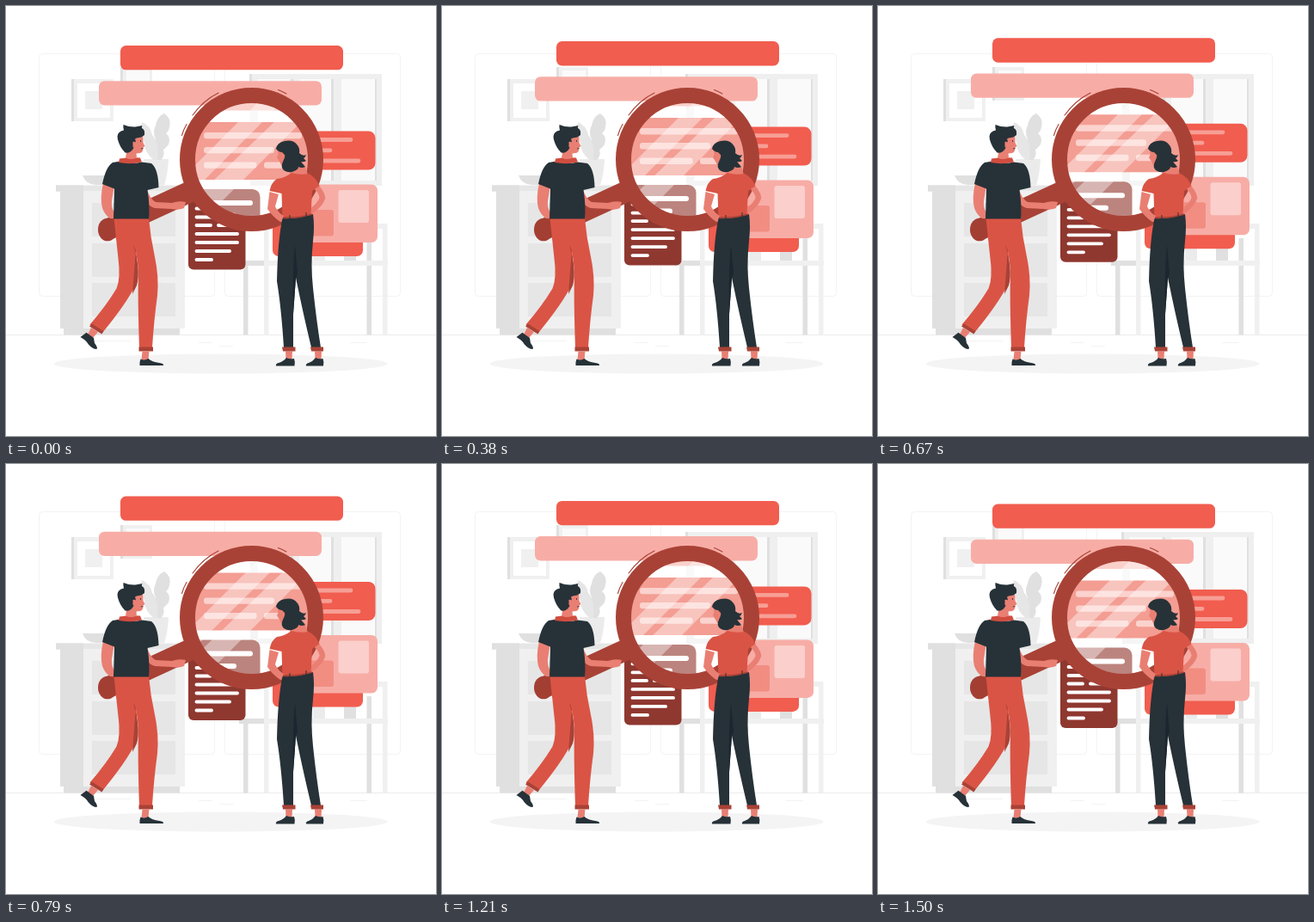
An HTML page for the animation above (1.54 s loop, 500x500 px).

```html
<!DOCTYPE html>
<html lang="en">
<head>
<meta charset="utf-8">
<title>Search illustration</title>
<style>
html, body { margin: 0; width: 100%; height: 100%; overflow: hidden; background: #fff; }
svg { display: block; width: 100vw; height: 100vh; }
.red { fill: #f15d4f; } .pink { fill: #f7ada6; } .rim { fill: #a94236; }
.dark { fill: #263238; } .skin { fill: #e97f73; } .cloth { fill: #da5445; }
.g1 { fill: #e0e0e0; } .g2 { fill: #e6e6e6; } .g3 { fill: #f0f0f0; } .g4 { fill: #fafafa; }
.line { fill: none; stroke: #a94236; stroke-width: 1.1; stroke-linecap: round; }
</style>
</head>
<body>
<svg viewBox="0 0 500 500">
<defs><clipPath id="glass"><circle cx="285.5" cy="178.5" r="66"/></clipPath></defs>

<!-- room -->
<g fill="none" stroke="#f3f3f3">
  <rect x="38.5" y="55.5" width="204" height="282" rx="4"/>
  <rect x="254.5" y="55.5" width="204" height="282" rx="4"/>
  <path d="M0 382.5H500" stroke="#ececec"/>
  <path d="M224 391.5h16M248 395.5h16M400 391.5h20M105 389.5h40"/>
</g>
<path class="g3" d="M76 85h49v49H76z"/>
<path class="g1" d="M76 85h3v49h-3z"/>
<path fill="#fff" d="M83 90h38v40H83z"/>
<path class="g3" d="M92 99h20v21H92z"/>
<path class="g3" d="M133 71h37v39h-37z"/>
<path class="g1" d="M133 71h3v39h-3z"/>
<path fill="#fafafa" d="M140 75h27v31h-27z"/>
<path fill="#efefef" d="M283 79h154v130H283z"/>
<path class="g4" d="M292 85h38v118h-38zM341 85h37v118h-37zM390 85h39v118h-39z"/>
<path class="g1" d="M283 79h3v130h-3zM331 85h3v118h-3zM378 85h3v118h-3zM429 85h2v118h-2z"/>

<path class="g1" d="M89 197h34v11h-18q-12 0-16-11z"/>
<path fill="#ebebeb" d="M160 178h29q-1 19-5 30h-18q-5-13-6-30z"/>
<path class="g1" d="M173 179q-4-14 1-24-4-8 0-16 2-11 10-14 9 6 6 16-1 5-4 7 6 5 3 13-4 5-6 6 2 8-3 12z"/>
<path fill="#e6e6e6" d="M172 179q-11-8-11-20-6-9-3-24 10 4 12 15 8 8 6 29z"/>
<path class="g2" d="M58 208.500h150v7H58z"/>
<path class="g1" d="M58 208.500h32v7H58zM63 215.500h27V375H63zM67 375h135v7.500H67z"/>
<path class="g3" d="M90 215.500h118V375H90z"/>
<path class="g2" d="M100 229h97v39h-97zM100 276h97v39h-97zM100 322h97v39h-97z"/>

<path class="g3" d="M300 253h143.500v129.500H438V259H305.500v123.500H300z"/>
<path class="g1" d="M276 300h5.500v82.500H276zM419.500 270h5.500v112.500h-5.500z"/>
<path class="g1" d="M393 280h14v17h-14z"/>
<path fill="#ebebeb" d="M357 280h14v17h-14z"/>
<path class="g3" d="M271 296h173v6H271z"/>
<path class="g1" d="M271 296h29v6h-29z"/>
<ellipse cx="249.500" cy="416" rx="194" ry="11.500" fill="#f4f4f4"/>

<!-- floating cards -->
<g class="float">
  <rect class="red" x="133" y="46" width="259" height="28.300" rx="6.500"/>
  <rect class="pink" x="108" y="87.200" width="259" height="28.300" rx="6.500"/>
  <rect class="red" x="320" y="145.500" width="109.500" height="45" rx="8"/>
  <path d="M346 155.500h55M346 167.800h31M346 180h64" stroke="#f79e95" stroke-width="4.800" stroke-linecap="round"/>
  <rect class="red" x="310" y="235" width="105" height="56" rx="7"/>
  <rect class="pink" x="335" y="207.500" width="97" height="67.500" rx="7"/>
  <rect x="386.500" y="214" width="35.500" height="38" rx="3" fill="#fbcfcb"/>
  <rect x="345" y="237" width="36" height="30.500" rx="3" fill="#f28d82"/>
  <rect x="212" y="218" width="66.500" height="88.500" rx="6" fill="#8f3830"/>
  <path d="M221.500 235.500h30M221.500 245.500h30M221.500 255h16.500M247 255h22M221.500 265h47.500M221.500 275h47.500M221.500 285h38.500M221.500 295h17.500" stroke="#fff" stroke-width="3.900" stroke-linecap="round"/>
</g>

<!-- lens -->
<g clip-path="url(#glass)">
  <path fill="#fff" d="M215 108h141v141H215z"/>
  <path fill="#f5f5f5" d="M284 113h9v96h-9zM331 113h8v96h-8zM284 203h60v6h-60z"/>
  <g class="float">
    <path fill="#fad0cb" d="M210 80h150v41.500H210z"/>
    <rect x="205" y="135" width="160" height="67" rx="8" fill="#f39d93"/>
    <g fill="#fbd2cd">
      <rect x="230" y="147" width="114" height="7.300" rx="3"/>
      <rect x="230" y="164" width="82" height="7.300" rx="3"/>
      <rect x="230" y="181.500" width="61.500" height="7.300" rx="3"/>
      <rect x="300" y="181.500" width="40" height="7.300" rx="3"/>
    </g>
    <rect x="200" y="213" width="95.500" height="80" rx="9" fill="#bc847e"/>
    <path d="M205 229h79M205 243.500h60" stroke="#fff" stroke-width="6" stroke-linecap="round"/>
  </g>
  <path fill="#fff" fill-opacity=".4" d="M297 108h28L205 228v-28zM370 108 235 243h-20V228L340 108z"/>
</g>
<path d="M120.500 259 216 215" stroke="#a94236" stroke-width="25" stroke-linecap="round"/>
<ellipse cx="118" cy="260" rx="11" ry="13.300" fill="#a33e33"/>
<circle cx="285.500" cy="178.500" r="74.500" fill="none" stroke="#a94236" stroke-width="18"/>
<path class="line" d="M204.500 150.500q2-7 5.500-13M217 127q12-17 30-26M316.500 97.500q5 2 9.500 4.500"/>

<!-- man -->
<path class="skin" d="M113 206q-4 17-1 29 3 8 9 12l6 0v-6q-5-5-4-14l3-19z"/>
<path class="cloth" d="M125.500 246.500h23l2 34q5 30-1 46-10 20-37 53l-15-9q19-22 31-42 5-12 2-35z"/>
<path class="rim" d="M148 278q9 30 4 47l-5 10 4-52zM100 369.500l13.500 8.500-2 3.500-14.500-9z"/>
<path class="skin" d="M99 374l8 5-6 7-6-4z"/>
<path class="dark" d="M93.500 379.800 102 386l1 6q4 5 2.500 7-5 0-10-6-3-5-9-8z"/>
<path class="cloth" d="M139 246.500h27q2 23 7 45 5 24 3 45-4 29-6 61h-15q-2-57-1-87-1-27-11-52z"/>
<path class="rim" d="M154.500 396.500h16.500v5h-16.500z"/>
<path class="skin" d="M158.500 401.500h8l-1 10h-8z"/>
<path class="dark" d="M156.500 410.500q5 2 9-.5 4 4 13 5 5 .5 4.500 3h-27.500q-.5-4 1-7.500z"/>
<path class="skin" d="M164 213q3 11 10 15l19 1q8-3 16-1l-2 7q-7 3-14 1l-20-1q-11-3-17-21z"/>
<path class="dark" d="M133 180.500q12 4 25 1l11 1.500q8 6 8.500 28l-13 3q3 18 1.500 33.500h-41l1-35-14-5.500q4-20 12-25z"/>
<path fill="#d04d40" d="M132 177.500q12-2 24-1l2 5q-13 3-27 .5z"/>
<path class="skin" d="M146 151h13l.5 8 2 4-2 1.500q0 6-4 6.500l-4 .5.500 5q-7 3-13 0l2-11z"/>
<path class="dark" d="M129.500 152q0-6 7.500-7.500-1-4-.5-6.500 7 3 14 2.500l8-1.500q-1 2-.5 3 4 2 3 8-3 3-9 3.500l-2 1q2 5-.5 8l-2 4q-3 5-9 4-6-6-8.500-15z"/>
<path class="skin" d="M147.500 158q4-1 4 3t-4 3z"/>
<path d="M156.500 156v2M157 166l2.500-.5" stroke="#263238" stroke-width=".8"/>

<!-- woman -->
<path d="M357 207q10 8 11 16-3 9-14 16" fill="none" stroke="#e97f73" stroke-width="6.500" stroke-linejoin="round"/>
<path class="skin" d="M331 187h17l3 9h-21z"/>
<path class="skin" d="M316 167h12v17q-5 3-8 1-1-3-2.500-5l-2.500-4 1.500-3z"/>
<path class="dark" d="M314 166q1-7 10-9 10-2 15 5 3 4 2 9 4 4 8 2-1 3-3 4l3 3q-3 2-6 1l5 6q-4 2-8 0 0 3-5 5-6 3-12-1-4-4-1-10 3-6 2-8l-3-3q-4 0-7-4z"/>
<path class="cloth" d="M315 201q9-1 17-7 9 3 20 1 8 4 12.500 14l-8.500 6-1.500 28q-16 6-33 4l-1-29-14-3q2-10 8.500-14z"/>
<path class="skin" d="M306.500 216l10.500 3-4 14q3 7 11 12l1 5-6 1q-9-6-15-15z"/>
<path class="dark" d="M321.500 247q18 1 35.500-5 2 14 0 31-3 28 0 55 4 38 9 69h-11q-9-37-18-81l-3 42v39h-11q-3-47-8-77 1-48 6.500-73z"/>
<path fill="#1b2630" d="M336 278l3 33-2 5-3 42q-1-50 2-80z"/>
<path d="M322 246q18 1 34-4" fill="none" stroke="#a94236" stroke-width="1.800"/>
<path d="M330 243v5M349 240v5" stroke="#263238"/>
<path class="skin" d="M325 401.500h8l-.5 9h-7zM359 401.500h8l-.5 9h-7z"/>
<path class="rim" d="M321 396.500h15.500v5h-14.500zM354 396.500h15v5h-14z"/>
<path class="dark" d="M326 409q4 2 9 1 1.500 4 .5 8.500H314q-1-2.500 3-3.500 6-2 9-6zM360 409q4 2 8.500 1 1.500 4 .5 8.500h-20q-1-2.500 3-3.500 5-2 8-6z"/>
</svg>
<script>
const LOOP = 1540, STEPS = 37, RISE = 10, TOP = 722;
const layers = document.querySelectorAll('.float');
const start = performance.now();

// Triangle wave, sampled at 24 steps a second
function lift(ms) {
  const t = Math.floor((ms + 3) / LOOP * STEPS) % STEPS * LOOP / STEPS;
  const gap = Math.abs(t - TOP);
  return Math.min(gap, LOOP - gap) / (LOOP / 2) * RISE - 9.4;
}

function draw() {
  const y = lift(Math.max(0, performance.now() - start) % LOOP);
  layers.forEach(g => g.setAttribute('transform', `translate(0 ${y.toFixed(2)})`));
  requestAnimationFrame(draw);
}
draw();
</script>
</body>
</html>
```
